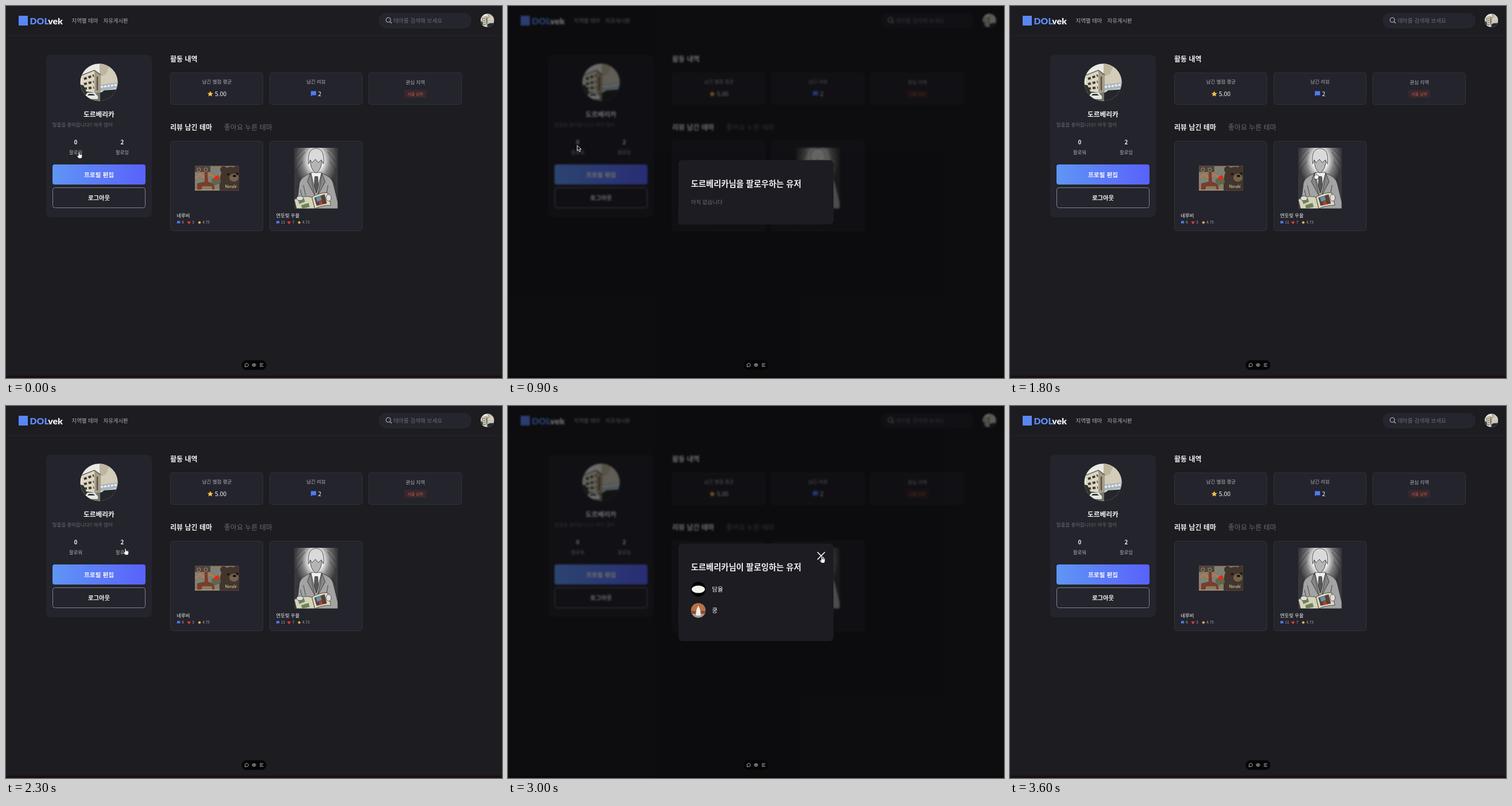
Write an HTML page that moves like this. It is 864x648 px and loops after 4100 ms.

```html
<!DOCTYPE html>
<html lang="ko">
<head>
<meta charset="utf-8">
<title>Profile followers</title>
<style>
  html, body { margin: 0; width: 100%; height: 100%; overflow: hidden; background: #1c1c21; }
  svg { display: block; width: 864px; height: 648px; }
  text { font-family: "Noto Sans CJK KR", "Noto Sans CJK JP", "Noto Sans CJK", sans-serif; fill: #f4f4f6; }
  .b { font-weight: 700; }
  .m { font-weight: 500; }
  .mid { text-anchor: middle; }
  .soft { fill: #b2b2ba; }
  .dim { fill: #6a6a73; }
  .tiny text { font-size: 6.5px; fill: #a9a9b2; }
  .card { fill: #24242d; stroke: #32323b; }
  .logo { font: 900 15.8px Lato, sans-serif; }
  .line { fill: none; stroke: #fff; stroke-linecap: round; }
</style>
</head>
<body>
<svg viewBox="0 0 864 648">
  <defs>
    <linearGradient id="blue"><stop stop-color="#5f95f5"/><stop offset="1" stop-color="#5862fa"/></linearGradient>
    <radialGradient id="glow" cx=".5" cy=".2" r=".7">
      <stop offset=".25" stop-color="#ececec"/><stop offset=".46" stop-color="#7d7d7f"/><stop offset=".7" stop-color="#39393b"/>
    </radialGradient>
    <clipPath id="round"><circle r="32.5"/></clipPath>
    <clipPath id="disc"><circle r="12.8"/></clipPath>
    <clipPath id="wide"><rect x="329" y="278.5" width="76.5" height="43"/></clipPath>
    <clipPath id="tall"><rect x="502" y="247" width="76" height="106"/></clipPath>
    <path id="star" fill="#f4c44e" d="M0-5L1.5-1.6 5-1.3 2.4 1.1 3.2 4.6 0 2.7-3.2 4.6-2.4 1.1-5-1.3-1.5-1.6Z"/>
    <path id="heart" fill="#ea3829" d="M0 4.6C-8-.5-4-6 0-2.6 4-6 8-.5 0 4.6Z"/>
    <path id="note" fill="#5279f4" d="M-4.5-4.5H4.5V2.8H-2.4L-4.5 4.4Z"/>
    <g id="photo" clip-path="url(#round)">
      <path fill="#e9e9e5" d="M-33-33H33V33H-33Z"/>
      <path fill="#d2ccb8" d="M1-33H33V4L1 8Z"/>
      <path fill="#bdb59f" d="M1-33L20-33 12-14 1-10Z"/>
      <path fill="#ddd5c1" d="M-30-12L-8-21 3-13V20H-30Z"/>
      <path fill="#a79d87" d="M-8-21L3-13V18L-8 18Z"/>
      <path fill="none" stroke="#4a463e" stroke-width="1.2" d="M-31-12L-8-21 3-13"/>
      <path stroke="#3d3b36" stroke-width="4" stroke-dasharray="5 3" d="M-26-6L-9-12M-26 3L-9-1M-26 11L-9 9"/>
      <path stroke="#5a5345" stroke-width="2.5" d="M-3-10V14"/>
      <path fill="#a9b6c1" d="M3 4L33 0V10L3 15Z"/>
      <path stroke="#f0f0ec" stroke-width="3" stroke-dasharray="4 2" d="M3 8L33 4"/>
      <path fill="#2f332c" d="M-33 4L-27 5-22 16-8 18V33H-33Z"/>
      <path fill="#77766f" d="M-14 20L33 12V33H-20Z"/>
      <path fill="#23272a" d="M2 19L9 14 33 12V33H2Z"/>
      <path fill="#e6e7e4" d="M-25 24L-20 18H-8L-2 24V29H-25Z"/>
      <path fill="#3a4145" d="M-20 23L-18 20H-10L-7 23Z"/>
    </g>
    <path id="cross" class="line" stroke-width="1.7" d="M-6-6L6 6M6-6L-6 6"/>
  </defs>

  <rect width="864" height="648" fill="#1c1c21"/>
  <g id="page">
    <path stroke="#25252b" d="M0 51.5H864"/>
    <rect x="22" y="17" width="16" height="17" fill="#5b86f5"/>
    <text class="logo" x="41.5" y="31.6"><tspan fill="#5f8df6">DOL</tspan>vek</text>
    <g font-size="9.4">
      <text class="soft" x="114.5" y="28.8">지역별 테마</text>
      <text class="soft" x="169.5" y="28.8">자유게시판</text>
      <rect x="649" y="12" width="162" height="27" rx="13.5" fill="#25252e"/>
      <text class="dim" x="675" y="28.8" font-size="9.6">테마를 검색해 보세요</text>
    </g>
    <g fill="none" stroke="#c2c2c9" stroke-width="1.1"><circle cx="666" cy="24.3" r="4"/><path d="M669 27.3L671.8 30"/></g>
    <use href="#photo" transform="translate(838.5 25.2) scale(.36)"/>

    <rect x="70" y="85" width="184" height="283" rx="8" fill="#24242d"/>
    <use href="#photo" x="162" y="133"/>
    <text class="b mid" x="162" y="193.3" font-size="11.7">도르베리카</text>
    <text class="dim" x="81" y="210" font-size="8.4">탈출을 좋아합니다!! 아주 많이</text>
    <g class="mid">
      <text class="b" x="121.5" y="240.6" font-size="9.8">0</text>
      <text class="b" x="202.5" y="240.6" font-size="9.8">2</text>
      <text class="soft" x="121.5" y="257.6" font-size="8.4">팔로워</text>
      <text class="soft" x="202.5" y="257.6" font-size="8.4">팔로잉</text>
      <rect x="81" y="276" width="162" height="35" rx="4" fill="url(#blue)"/>
      <rect x="81.5" y="316.5" width="161" height="35" rx="4" fill="none" stroke="#83838b"/>
      <text class="b" x="162" y="297.5" font-size="10.7">프로필 편집</text>
      <text class="b" x="162" y="338" font-size="10.4">로그아웃</text>
    </g>

    <text class="b" x="286" y="96.5" font-size="12">활동 내역</text>
    <rect class="card" x="286.5" y="116.5" width="161" height="55" rx="4"/>
    <rect class="card" x="459.5" y="116.5" width="161" height="55" rx="4"/>
    <rect class="card" x="632" y="116.5" width="161.5" height="55" rx="4"/>
    <g class="mid" font-size="8.5">
      <text class="soft" x="367.5" y="135.3">남긴 별점 평균</text>
      <text class="soft" x="540" y="135.3">남긴 리뷰</text>
      <text class="soft" x="713" y="136.3">관심 지역</text>
      <rect x="694" y="146" width="38" height="14" rx="3" fill="#38282c"/>
      <text x="713" y="155.7" font-size="7.1" style="fill:#c45b40">서울 남부</text>
    </g>
    <use href="#star" x="355.8" y="153"/>
    <text class="m" x="363.7" y="157.3" font-size="10.5">5.00</text>
    <use href="#note" x="535.6" y="152.8"/>
    <text class="m" x="543.6" y="157.3" font-size="10.5">2</text>

    <text class="b" x="286" y="216" font-size="12">리뷰 남긴 테마</text>
    <text class="dim" x="379.8" y="216" font-size="12">좋아요 누른 테마</text>
    <rect class="card" x="286.5" y="235.5" width="161" height="156" rx="4"/>
    <rect class="card" x="459.5" y="235.5" width="161" height="156" rx="4"/>

    <g clip-path="url(#wide)">
      <path fill="#8b7b68" d="M329 278H406V322H329Z"/>
      <g fill="none" stroke-width="3.5">
        <path stroke="#6c8788" d="M329 291L338 284 347 291 356 284 365 291 374 284"/>
        <path stroke="#ab7d57" d="M329 300L338 293 347 300 356 293 365 300 374 293"/>
        <path stroke="#708986" d="M329 309L338 302 347 309 356 302 365 309 374 302"/>
      </g>
      <path fill="#51443a" d="M329 278H356V289H329Z"/>
      <g fill="none" stroke="#a4927a"><circle cx="336" cy="285" r="3"/><circle cx="348" cy="285" r="3"/></g>
      <path fill="#793f2c" d="M346 289H351L352 306 363 310V320H360L358 314H342L340 320H333V309L346 306Z"/>
      <path stroke="#c4aa83" d="M329 320.5H372"/>
      <path fill="#566a50" d="M357 303L370 294 375 308 362 313Z"/>
      <g fill="#41352d">
        <circle cx="379" cy="285" r="6"/><circle cx="403" cy="283" r="6"/>
        <ellipse cx="392" cy="300" rx="19" ry="20"/><path d="M372 308H406V322H372Z"/>
      </g>
      <ellipse cx="397" cy="299" rx="8" ry="7" fill="#75604b"/>
      <g fill="#17120f"><circle cx="387" cy="293" r="2"/><circle cx="403" cy="292" r="2"/><ellipse cx="398" cy="296" rx="3" ry="2"/></g>
      <text x="381.5" y="317.3" style="font:italic 7.2px Lato,sans-serif;fill:#e1d1a8">Nerubi</text>
    </g>
    <circle cx="367" cy="300" r="4" fill="#e3291e"/>

    <g clip-path="url(#tall)">
      <path fill="url(#glow)" d="M502 247H578V353H502Z"/>
      <path stroke="#2a2a2c" stroke-width=".7" d="M502 266L518 249M502 278L521 254M502 292L517 270M578 264L563 249M578 277L560 254M578 293L564 270M504 320L514 302M577 316L568 300"/>
      <g stroke="#303032" stroke-width=".8">
        <path fill="#a3a3a4" d="M506 353L511 309Q513 298 531 291H549Q567 297 570 309L578 342V353Z"/>
        <path fill="#f0f0f0" d="M531 290L540 326 550 290Z"/>
        <path fill="#59595b" d="M538 297H543L544 314 541 325 537 314Z"/>
        <path fill="#858587" d="M530 291L525 306 538 330 534 311ZM550 291L556 306 543 330 547 311Z"/>
        <path fill="#b5b5b6" d="M530 264Q529 285 540 291 551 285 550 264Z"/>
        <path fill="#dadadb" d="M527 275Q524 249 540 248 556 249 553 275L549 268 544 273 539 267 533 273 530 268Z"/>
        <path fill="none" d="M518 312L522 330M561 312L558 328M513 320L516 334"/>
        <path fill="#d4d4bc" d="M502 337Q520 329 533 333L538 353H506Z"/>
        <path fill="#dedac5" d="M533 333Q546 325 560 325L566 347Q549 347 538 353Z"/>
      </g>
      <path fill="#5b3f30" d="M537 334L555 328 559 344 541 348Z"/>
      <path fill="#5a96b3" d="M540 334L548 331 550 338 542 341Z"/>
      <path fill="#b34132" d="M545 341L550 339 552 345 546 347Z"/>
      <path fill="#71825a" d="M509 339L519 335 521 341 511 345ZM514 347L527 343 529 350 516 353Z"/>
      <g fill="#dcdcdc" stroke="#333" stroke-width=".7"><ellipse cx="512" cy="335" rx="6" ry="4"/><ellipse cx="562" cy="334" rx="4.5" ry="6"/></g>
    </g>

    <g class="m" font-size="8.4">
      <text x="297.3" y="367.5">네루비</text>
      <text x="470.5" y="367.5">연둣빛 우물</text>
    </g>
    <g class="tiny" id="counts"></g>
    <rect y="644" width="864" height="4" fill="#190f13"/>
  </g>

  <rect id="shade" width="864" height="648" fill-opacity=".54"/>

  <g id="followers">
    <rect x="297" y="268.5" width="270" height="112" rx="7" fill="#1c1c22"/>
    <text class="b" x="318.7" y="315.3" font-size="14.3">도르베리카님을 팔로우하는 유저</text>
    <text class="dim" x="318.7" y="345.4" font-size="9.5">아직 없습니다</text>
    <use id="close" href="#cross" x="545.5" y="290"/>
  </g>

  <g id="following">
    <rect x="297" y="239.5" width="270" height="170" rx="7" fill="#1c1c22"/>
    <text class="b" x="318.7" y="286.3" font-size="14.3">도르베리카님이 팔로잉하는 유저</text>
    <text x="355.3" y="323.3" font-size="10.6">담율</text>
    <text x="355.3" y="359.8" font-size="10.6">쿵</text>
    <use href="#cross" x="545.5" y="261"/>
    <g id="faces">
      <g transform="translate(331.5 319.3)"><circle r="12.8"/><ellipse rx="11.5" ry="6.5" fill="#f3f3ee"/></g>
      <g transform="translate(331.5 356)" clip-path="url(#disc)">
        <path fill="#b87046" d="M-13-13H13V13H-13Z"/>
        <path fill="#874e34" d="M-13 1H13V6H-13Z"/>
        <path fill="#a99b91" d="M-13 6H13V13H-13Z"/>
        <path fill="#efece8" d="M0-8Q5 0 4 9H-4Q-5 0 0-8Z"/>
      </g>
    </g>
  </g>

  <g>
    <rect x="410.5" y="617" width="43" height="17" rx="8.5" fill="#050506"/>
    <g fill="none" stroke="#c9c9ce" stroke-width=".9">
      <path d="M416.2 628.4L416.7 626.8A3 2.9 0 1 1 418 628Z"/>
      <ellipse cx="432" cy="625.3" rx="3.1" ry="2.3"/><circle cx="432" cy="625.3" r="1"/>
      <path d="M442 623H448.3M442 625.4H446.5M442 627.8H448.3"/>
    </g>
  </g>

  <g id="cursor">
    <path id="arrow" fill="#0b0b0c" stroke="#fff" stroke-width=".9" d="M0 0V9.2L2.2 7.2 3.8 10.8 5.6 10 4 6.6 7 6.4Z"/>
    <path id="hand" fill="#fff" stroke="#111" stroke-width=".7" d="M-1 .8Q0-.6 1.1.8V4.2Q2.2 3.6 2.9 4.6 4 4.1 4.5 5.1 5.8 4.8 5.8 6.2 5.9 9.6 4.4 11.6H-.4Q-1.6 9.3-3.4 7.4-3.5 5.7-1 7Z"/>
  </g>
</svg>
<script>
const $ = id => document.getElementById(id);
const show = (id, on) => $(id).style.display = on ? '' : 'none';

// Review, like and rating counts under each theme
const count = (icon, x, value, textX) =>
  `<use href="#${icon}" transform="translate(${x} 377) scale(.58)"/><text x="${textX}" y="379.3">${value}</text>`;
$('counts').innerHTML =
  count('note', 300.7, 8, 306.3) + count('heart', 318.8, 3, 324.3) + count('star', 337, '4.75', 342.3) +
  count('note', 473.7, 11, 479) + count('heart', 493, 7, 498.6) + count('star', 510.8, '4.73', 516.3);

// Pointer route: time, x, y
const route = [
  [0, 127, 254], [600, 120.5, 243], [1000, 120.5, 243], [1500, 545, 287], [1700, 545, 287],
  [1800, 532, 290], [2200, 208, 248], [2500, 208, 248], [2900, 546.5, 262],
  [3400, 546.5, 262], [3600, 600, 140]
];
const pointer = t => {
  const i = Math.max(1, route.findIndex(k => k[0] >= t));
  const [t0, x0, y0] = route[i - 1], [t1, x1, y1] = route[i];
  const e = (1 - Math.cos(Math.PI * (t - t0) / (t1 - t0))) / 2;
  return [x0 + (x1 - x0) * e, y0 + (y1 - y0) * e];
};
const inside = (x, y, l, t, r, b) => x > l && x < r && y > t && y < b;

function draw(t) {
  const first = t >= 900 && t < 1700, second = t >= 2400 && t < 3400;
  const open = first || second;
  show('followers', first);
  show('close', t >= 1000);
  show('following', second);
  show('faces', t >= 2500);
  show('shade', open);
  $('page').style.filter = open ? 'blur(1.7px)' : 'none';

  show('cursor', t < 3600);
  if (t >= 3600) return;
  const [x, y] = pointer(t);
  const hand = open
    ? Math.hypot(x - 545.5, y - (first ? 290 : 261)) < 10
    : inside(x, y, 100, 228, 224, 262) || inside(x, y, 286, 235, 448, 392) || inside(x, y, 459, 235, 621, 392);
  show('hand', hand);
  show('arrow', !hand);
  $('cursor').setAttribute('transform', `translate(${x} ${y})`);
}

const start = performance.now();
function tick() {
  const t = (performance.now() - start) % 4100;
  draw(Math.floor(t / 100) * 100);
  requestAnimationFrame(tick);
}
tick();
</script>
</body>
</html>
```
